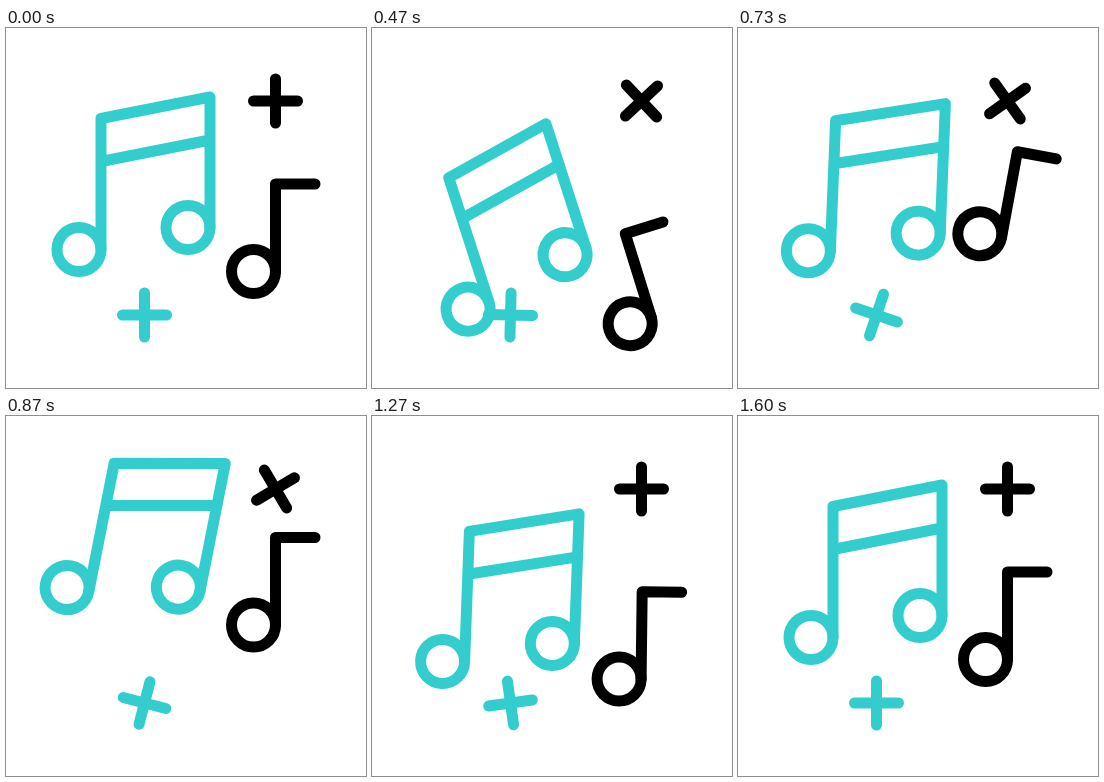
Animation, 360 px wide and 360 px high, one loop 2000 ms. Source, as an HTML page:

```html
<!DOCTYPE html>
<html lang="en">
<head>
<meta charset="utf-8">
<title>Dancing notes</title>
<style>
  html, body { margin: 0; width: 100%; height: 100%; overflow: hidden; background: #fff; }
  svg { display: block; width: 100%; height: 100%; }
  g { fill: none; stroke-width: 11; stroke-linecap: round; stroke-linejoin: round; }
  .teal { stroke: #33cdcd; }
  .black { stroke: #000; }
</style>
</head>
<body>
<svg viewBox="0 0 360 360">
  <g class="teal" id="bigNote">
    <path d="M95 221V90.500L204 69V199.500M95 133.500L204 112"/>
    <circle cx="73" cy="221.500" r="22"/>
    <circle cx="182" cy="199.500" r="22"/>
  </g>
  <g class="black" id="smallNote">
    <path d="M269.500 243.500V156H309"/>
    <circle cx="247.500" cy="243.500" r="22"/>
  </g>
  <g class="black" id="blackPlus"><path d="M247.500 73h44m-22-22v44"/></g>
  <g class="teal" id="tealPlus"><path d="M116.500 287h44m-22-22v44"/></g>
</svg>
<script>
const FPS = 30, LOOP = 2000, LAST = 48;

// Smooth curve through [frame, value] points, flat at peaks and ends.
function track(...points) {
  const rate = (a, b) => (b[1] - a[1]) / (b[0] - a[0]);
  const slopes = points.map((p, i) => {
    const before = points[i - 1], after = points[i + 1];
    if (!before || !after || rate(before, p) * rate(p, after) <= 0) return 0;
    return rate(before, after);
  });
  return frame => {
    if (frame <= points[0][0]) return points[0][1];
    const i = points.findIndex(p => p[0] >= frame);
    if (i < 0) return points[points.length - 1][1];
    const [x0, y0] = points[i - 1], [x1, y1] = points[i];
    const span = x1 - x0, s = (frame - x0) / span, r = 1 - s;
    return y0 * r * r * (1 + 2 * s) + y1 * s * s * (3 - 2 * s)
      + span * s * r * (slopes[i - 1] * r - slopes[i] * s);
  };
}

// Both notes share one damped bounce; the big one follows three frames later.
const bounce = track([0, 0], [5, 15], [8, 28.4], [12.5, 50], [16, 37.7], [19, 3.5],
  [23, -38], [26, -34.5], [29, -12], [32, 12], [35, 26], [38, 19.7], [45, 0]);
const tilt = track([0, 0], [5, -7], [8, -15.5], [12, -18], [16, -13.6], [19, 2.3],
  [23, 11.2], [26, 0], [29, -6], [32, 0], [35, 2.1], [38, 0.7], [45, 0]);
const blackSpin = track([0, 0], [8, -45], [19, -40], [26, -30.5], [32, -37.5], [38, 0]);
const tealSpin = track([0, 0], [8, -23.5], [19, 20.5], [26, 14.5], [32, 13.3], [38, -8], [48, 0]);

function pose(id, x, y, angle, shift = 0) {
  document.getElementById(id)
    .setAttribute("transform", `translate(0 ${shift}) rotate(${angle} ${x} ${y})`);
}

function draw(now) {
  const frame = Math.min(LAST, Math.floor((now % LOOP + 5) * FPS / 1000));
  pose("bigNote", 128, 155, tilt(frame - 3), bounce(frame - 3));
  pose("smallNote", 267.5, 210.5, tilt(frame), bounce(frame));
  pose("blackPlus", 269.5, 73, blackSpin(frame));
  pose("tealPlus", 138.5, 287, tealSpin(frame));
  requestAnimationFrame(draw);
}
requestAnimationFrame(draw);
</script>
</body>
</html>
```
